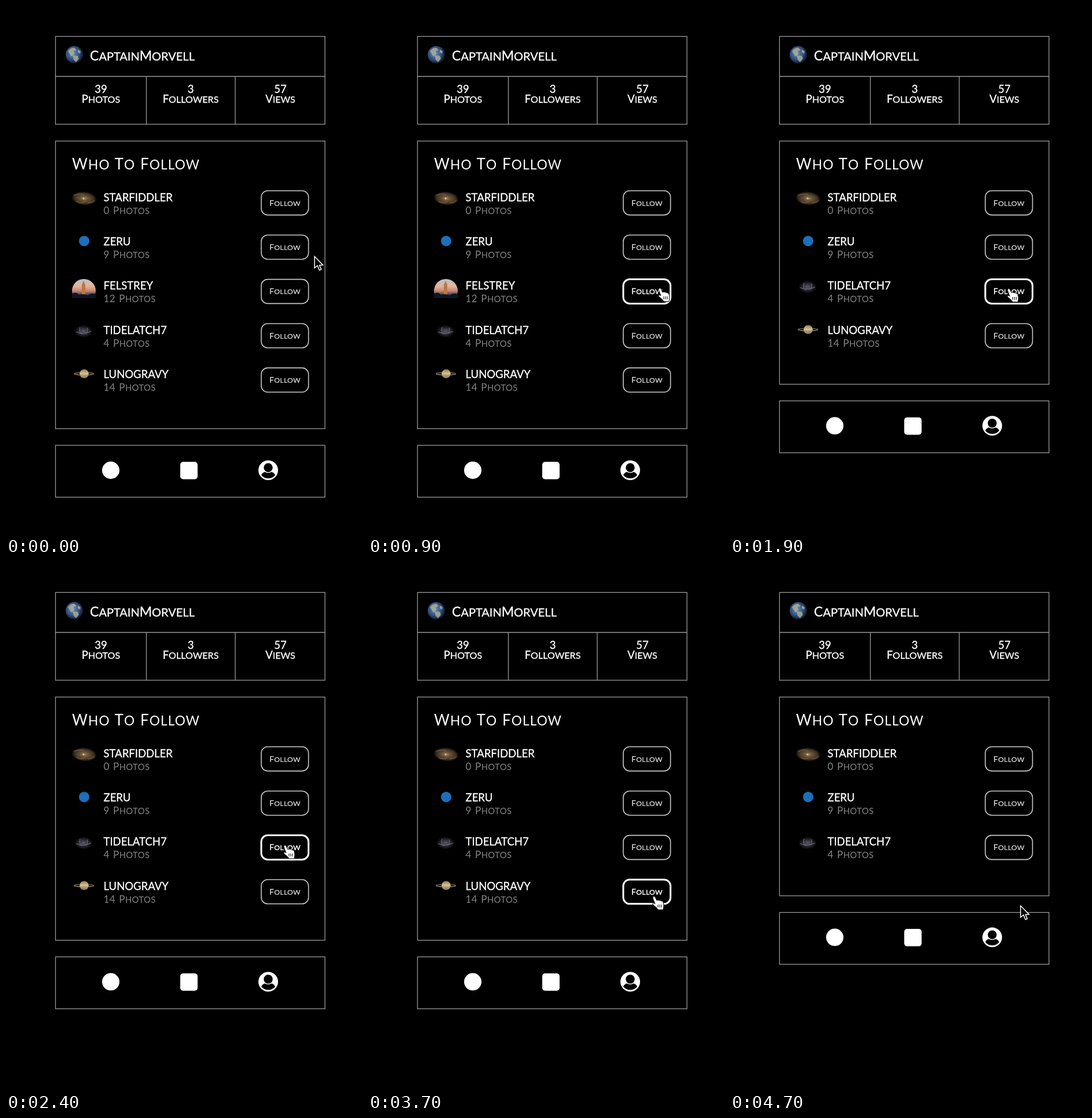
Animation of 615x911 px, one loop 4.8 s. Source, as an HTML page:

```html
<!DOCTYPE html>
<html lang="en">
<head>
<meta charset="utf-8">
<title>Who To Follow</title>
<style>
  html, body { margin: 0; width: 100%; height: 100%; overflow: hidden; background: #000; }
  svg { display: block; width: 615px; height: 911px; }
  text { font-family: Lato, "Open Sans", sans-serif; fill: #fff; stroke: #fff; stroke-width: .35px; }
  .small { font-size: .87em; }
  .mid { text-anchor: middle; }
  .frame { fill: none; stroke: #999; stroke-width: 1.3; }
  .user { font-size: 23px; }
  .stat { font-size: 18.5px; }
  .title { font-size: 26px; letter-spacing: 1.1px; word-spacing: 1px; stroke: none; }
  .name { font-size: 18.5px; }
  .count { font-size: 17px; fill: #858585; stroke: none; word-spacing: 1.5px; letter-spacing: .4px; }
  .button rect { fill: #000; stroke: #c8c8c8; stroke-width: 1.6; }
  .button text { font-size: 14px; letter-spacing: .3px; fill: #e4e4e4; stroke: #e4e4e4; stroke-width: .2px; }
  .hover rect { stroke: #fff; stroke-width: 3; }
  .hover text { fill: #fff; stroke: #fff; stroke-width: .4px; }
</style>
</head>
<body>
<svg viewBox="0 0 615 911">
  <defs>
    <radialGradient id="earth" cx=".42" cy=".42" r=".6">
      <stop offset="0" stop-color="#6f8fbb"/><stop offset=".6" stop-color="#33517f"/><stop offset="1" stop-color="#0d1629"/>
    </radialGradient>
    <radialGradient id="galaxy">
      <stop offset="0" stop-color="#a88a5f"/><stop offset=".3" stop-color="#6b5539"/>
      <stop offset=".75" stop-color="#3d3022"/><stop offset="1" stop-color="#000"/>
    </radialGradient>
    <linearGradient id="dusk" x2="0" y2="1">
      <stop offset="0" stop-color="#b9c3cf"/><stop offset=".3" stop-color="#e6b39a"/>
      <stop offset=".5" stop-color="#c98672"/><stop offset=".65" stop-color="#3d4a68"/><stop offset="1" stop-color="#0a0d14"/>
    </linearGradient>
    <radialGradient id="metal">
      <stop offset="0" stop-color="#5d5a69"/><stop offset=".5" stop-color="#2c2a33"/><stop offset="1" stop-color="#000"/>
    </radialGradient>
    <linearGradient id="planet" x2="0" y2="1">
      <stop offset="0" stop-color="#8f7c5c"/><stop offset=".5" stop-color="#d9c391"/><stop offset="1" stop-color="#7d6a4c"/>
    </linearGradient>
    <clipPath id="crop"><path d="M114 465h41v39h-41z"/></clipPath>
  </defs>

  <rect class="frame" x="85.5" y="52.5" width="465.5" height="151.5"/>
  <path class="frame" d="M85.5 121.5H551M242.5 121.5V204M396 121.5V204"/>
  <circle cx="118" cy="84" r="15" fill="url(#earth)"/>
  <path d="M107 78q5-7 11-6l4 4-5 2 1 5-5 4zM115 85l9 1 2 5-5 6-4-4zM124 75l5 3-1 4-4-2z" fill="#b0b098" opacity=".8"/>
  <text class="user" x="145" y="94">CaptainMorvell</text>
  <g id="stats"></g>

  <rect class="frame" id="panel" x="85.5" y="233" width="465.5"/>
  <text class="title" x="114" y="281.5">Who To Follow</text>
  <g id="rows"></g>

  <g id="footer">
    <rect class="frame" x="85.5" y="758" width="465.5" height="89.5"/>
    <circle cx="181" cy="801" r="15" fill="#fff"/>
    <rect x="301" y="786.5" width="30" height="30" rx="5" fill="#fff"/>
    <circle cx="453" cy="801" r="17" fill="#fff"/>
    <circle cx="453" cy="796.5" r="7.7"/>
    <path d="M441 809.500q2-5 6.500-5.500 5.500 3 11 0 4.500 .5 6.500 5.500-5 5.500-12 5.500t-12-5.500z"/>
  </g>

  <path id="arrow" d="M0 0V20L5 16 8.500 24 11.500 22.500 8.500 15.500 14.500 15z" fill="#000" stroke="#fff" stroke-width="1.5"/>
  <g id="hand">
    <path d="M0 0q2-1 3 1l3 6q2-2 4 0 2-1 3 1 3-1 4 2l1 6-1 7H8l-2-3-7-6q-1-3 3-2l1 1-4-10q0-2 1-3z" fill="#fff" stroke="#000"/>
    <path d="M8 14v5m3-5v5m3-5v5" stroke="#000"/>
  </g>
</svg>
<script>
const LOOP = 4800, TICK = 100, PITCH = 76.4;
const $ = id => document.getElementById(id);

// Pictures are drawn at the place of the first row.
const pictures = {
  galaxy: `<ellipse cx="135" cy="332" rx="22" ry="12" fill="url(#galaxy)" transform="rotate(5 135 332)"/>
    <path d="M117 327q10-5 18-1M141 339q8 1 12-4M122 337q8 5 15 0" fill="none" stroke="#7a6344" stroke-width="2" opacity=".6"/>
    <circle cx="134" cy="332" r="1.500" fill="#dcc08e"/>`,
  badge: `<circle cx="135" cy="329" r="9" fill="#1c6fba"/>`,
  tower: `<g transform="translate(0 -152.800)" clip-path="url(#crop)">
    <circle cx="134.500" cy="491.500" r="20.500" fill="url(#dusk)"/>
    <path d="M131 504V481l3-7 3 7v23z" fill="#b87a45"/>
    <path d="M114 497q6-5 12 1 9-2 15 1 7-5 14-2v8h-41z" fill="#10141f"/></g>`,
  station: `<ellipse cx="134" cy="332" rx="16" ry="11" fill="url(#metal)"/>
    <path d="M121 333q12 6 26-1M128 325q-3 8 3 12M140 326q3 6-2 10" fill="none" stroke="#77748a"/>`,
  rings: `<ellipse cx="134.500" cy="329" rx="17" ry="2.200" fill="none" stroke="#81755f" stroke-width="1.200"/>
    <circle cx="135" cy="329" r="7.800" fill="url(#planet)"/>
    <path d="M118 329.500q17 4 34 0" fill="none" stroke="#9d8d6e"/>`
};

const people = [
  { name: "STARFIDDLER", photos: 0, picture: "galaxy" },
  { name: "ZERU", photos: 9, picture: "badge" },
  { name: "FELSTREY", photos: 12, picture: "tower", leave: 1900 },
  { name: "TIDELATCH7", photos: 4, picture: "station" },
  { name: "LUNOGRAVY", photos: 14, picture: "rings", leave: 4100 }
];

// Pointer tip: time, x, y
const track = [
  [0, 533, 432], [300, 538, 435], [600, 536, 450], [900, 503, 487],
  [1400, 480, 487], [2500, 481, 489], [3000, 493, 525], [3200, 508, 560],
  [3400, 525, 597], [3700, 493, 577], [4100, 495, 579], [4300, 498, 586], [4700, 502, 593]
];

$("stats").innerHTML = [[164, 39, "Photos"], [319, 3, "Followers"], [474, 57, "Views"]]
  .map(([x, n, label]) => `<text class="stat mid" x="${x}" y="150">${n}</text>
    <text class="stat mid" x="${x}" y="166.500">${label}</text>`).join("");

$("rows").innerHTML = people.map(p => `<g>${pictures[p.picture]}
  <text class="name" x="168.500" y="336.500">${p.name}</text>
  <text class="count" x="168.500" y="358.500">${p.photos} Photos</text>
  <g class="button"><rect x="441" y="318.800" width="81.600" height="41.800" rx="11"/>
  <text class="mid" x="482" y="344.500">Follow</text></g></g>`).join("");

// Lower-case letters become small capitals.
document.querySelectorAll("text").forEach(el => {
  el.innerHTML = el.textContent.replace(/[a-z]+/g, s => `<tspan class="small">${s.toUpperCase()}</tspan>`);
});

const rowEls = [...$("rows").children];
const move = (el, x, y) => el.setAttribute("transform", `translate(${x} ${y})`);
const show = (el, on) => { el.style.display = on ? "" : "none"; };

function pointerAt(t) {
  const i = track.findIndex(p => p[0] > t);
  if (i < 0) return track[track.length - 1].slice(1);
  const [t0, x0, y0] = track[i - 1], [t1, x1, y1] = track[i];
  const k = (t - t0) / (t1 - t0), e = k * k * (3 - 2 * k);
  return [x0 + (x1 - x0) * e, y0 + (y1 - y0) * e];
}

function draw(t) {
  const [px, py] = pointerAt(t);
  let count = 0, over = false;
  people.forEach((p, i) => {
    const el = rowEls[i], here = !p.leave || t < p.leave;
    show(el, here);
    if (!here) return;
    const y = count++ * PITCH;
    const hit = px > 440 && px < 524 && py > 318 + y && py < 362 + y;
    move(el, 0, y);
    el.querySelector(".button").classList.toggle("hover", hit);
    over = over || hit;
  });
  const lift = (people.length - count) * 76.7;
  $("panel").setAttribute("height", 496.3 - lift);
  move($("footer"), 0, -lift);
  show($("hand"), over);
  show($("arrow"), !over);
  move(over ? $("hand") : $("arrow"), px, py);
}

function loop() {
  draw(Math.floor(performance.now() % LOOP / TICK) * TICK);
  requestAnimationFrame(loop);
}
loop();
</script>
</body>
</html>
```
